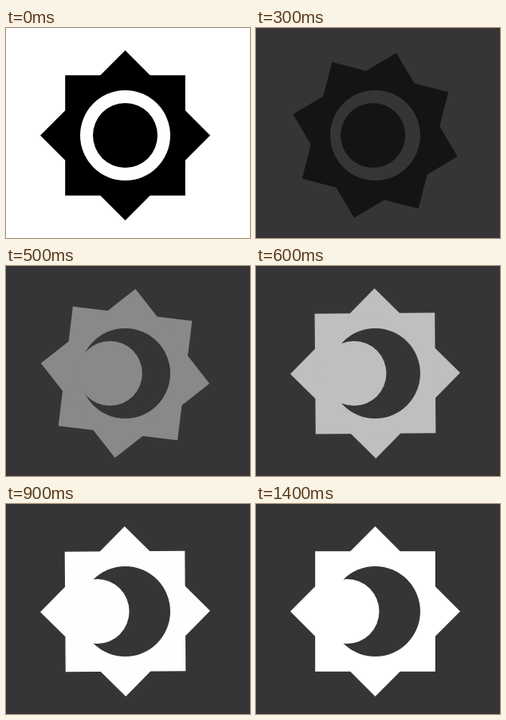
Recreate the animation shown at these times as an HTML page. Size 306 by 263 pixels, loop 2.7 s.

```html
<!DOCTYPE html>
<html lang="en">
<head>
<meta charset="utf-8">
<title>Sun to moon</title>
<style>
  html, body { margin: 0; width: 100%; height: 100%; overflow: hidden; }
  svg { display: block; width: 306px; height: 263px; }
</style>
</head>
<body>
<svg viewBox="0 0 306 263">
  <rect id="back" width="306" height="263"/>
  <g id="icon" transform="translate(149.5 134.5)">
    <g id="star">
      <rect x="-75.3" y="-75.3" width="150.6" height="150.6"/>
      <rect x="-75.3" y="-75.3" width="150.6" height="150.6" transform="rotate(45)"/>
    </g>
    <circle id="hole" r="56.5"/>
    <circle id="core" r="40.5"/>
  </g>
</svg>
<script>
const [back, icon, star, hole, core] =
  ['back', 'icon', 'star', 'hole', 'core'].map(id => document.getElementById(id));
const LOOP = 2700, STEP = 100, SWITCH = 200, START = 187, DURATION = 749;

// Cubic Bézier easing (0.325, 0, 0.4, 1), solved by bisection
function ease(x) {
  if (x <= 0) return 0;
  if (x >= 1) return 1;
  let lo = 0, hi = 1;
  for (let i = 0; i < 24; i++) {
    const s = (lo + hi) / 2, r = 1 - s;
    if (3 * r * r * s * 0.325 + 3 * r * s * s * 0.4 + s ** 3 < x) lo = s;
    else hi = s;
  }
  return lo * lo * (3 - 2 * lo);
}

function draw(now) {
  // The motion advances in tenths of a second
  const time = Math.floor(now % LOOP / STEP) * STEP;
  const dark = time >= SWITCH;
  const p = dark ? ease((time - START) / DURATION) : 0;
  const level = Math.round(255 * p);
  const ground = dark ? '#363437' : '#fff';
  back.setAttribute('fill', ground);
  hole.setAttribute('fill', ground);
  icon.setAttribute('fill', `rgb(${level},${level},${level})`);
  star.setAttribute('transform', `rotate(${180 * p})`);
  core.setAttribute('cx', -35.5 * p);
}

const begin = performance.now();
function tick() {
  draw(performance.now() - begin);
  requestAnimationFrame(tick);
}
tick();
</script>
</body>
</html>
```
